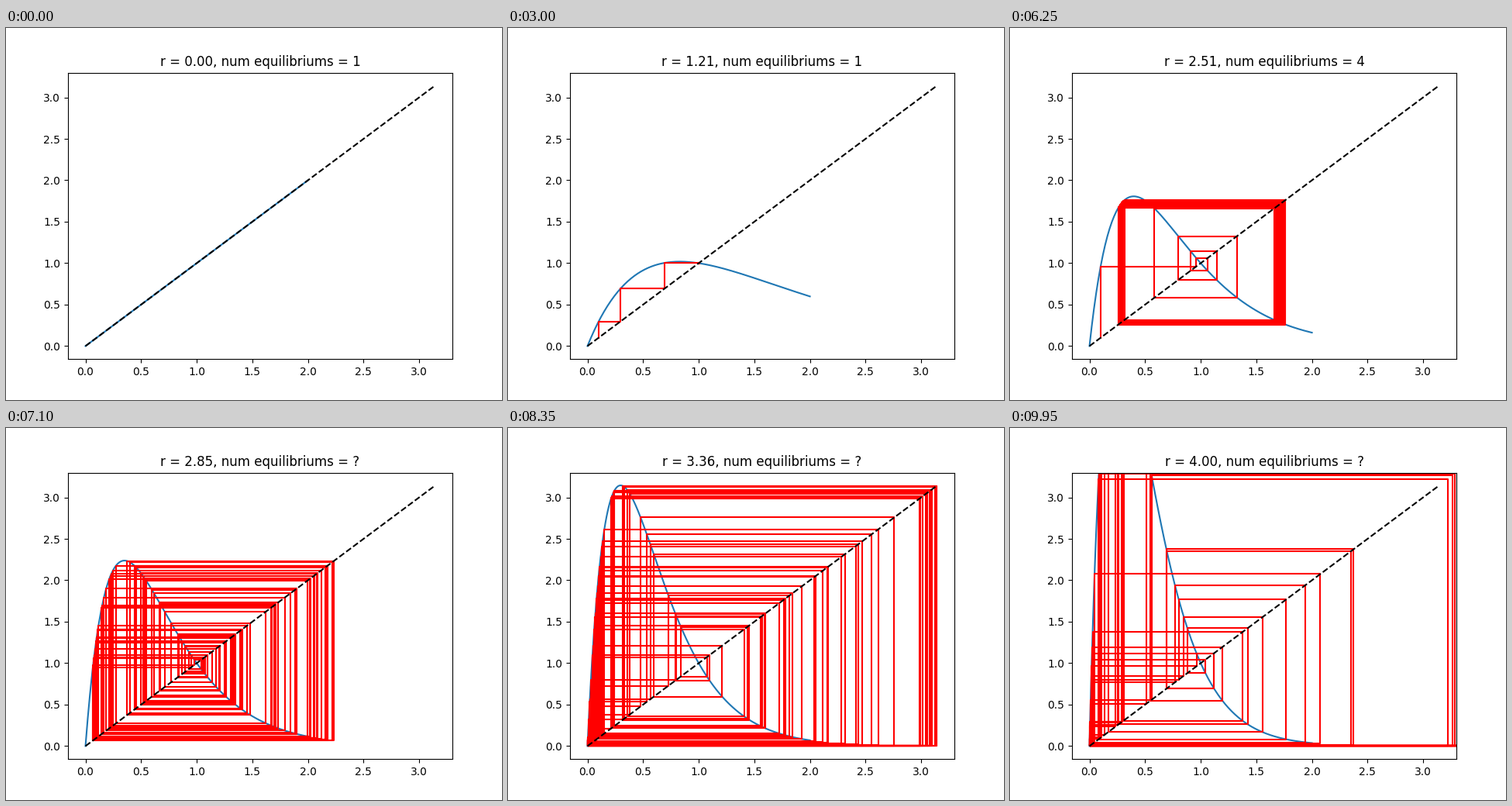
Recreate the animation shown at these times as a matplotlib script. Size 640 by 480 pixels, loop 10000 ms.

```python
import matplotlib.pyplot as plt
import numpy as np
from matplotlib.animation import FuncAnimation

FRAMES = 200
STEPS = 100
START = 0.1
RATES = np.linspace(0, 4, FRAMES)

# Upper bound of r for each label of the long-run behaviour
LABELS = [(1.94, "1"), (2.5, "2"), (2.66, "4"), (2.69, "8"),
          (3.1, "?"), (3.15, "3"), (np.inf, "?")]


def ricker(x, r):
    return x * np.exp(r * (1 - x))


def cobweb(r):
    """Corner points of the staircase between the map and the diagonal."""
    orbit = [START]
    for _ in range(STEPS):
        orbit.append(ricker(orbit[-1], r))
    corners = np.repeat(orbit, 2)
    return corners[:-2], np.append(START, corners[2:-1])


def label(r):
    return next(text for bound, text in LABELS if r < bound)


fig, ax = plt.subplots(figsize=(6.4, 4.8), dpi=100)
xs = np.linspace(0, 2, 200)
curve, = ax.plot([], [])
web, = ax.plot([], [], "r")
ax.plot([0, np.pi], [0, np.pi], "k--")
margin = 0.05 * np.pi
ax.set_xlim(-margin, np.pi + margin)
ax.set_ylim(-margin, np.pi + margin)
title = ax.set_title("")


def update(i):
    r = RATES[i]
    curve.set_data(xs, ricker(xs, r))
    web.set_data(*cobweb(r))
    title.set_text(f"r = {r:.2f}, num equilibriums = {label(r)}")
    return curve, web, title


anim = FuncAnimation(fig, update, frames=FRAMES, interval=50,
                     repeat=True, repeat_delay=0)
plt.show()
```
